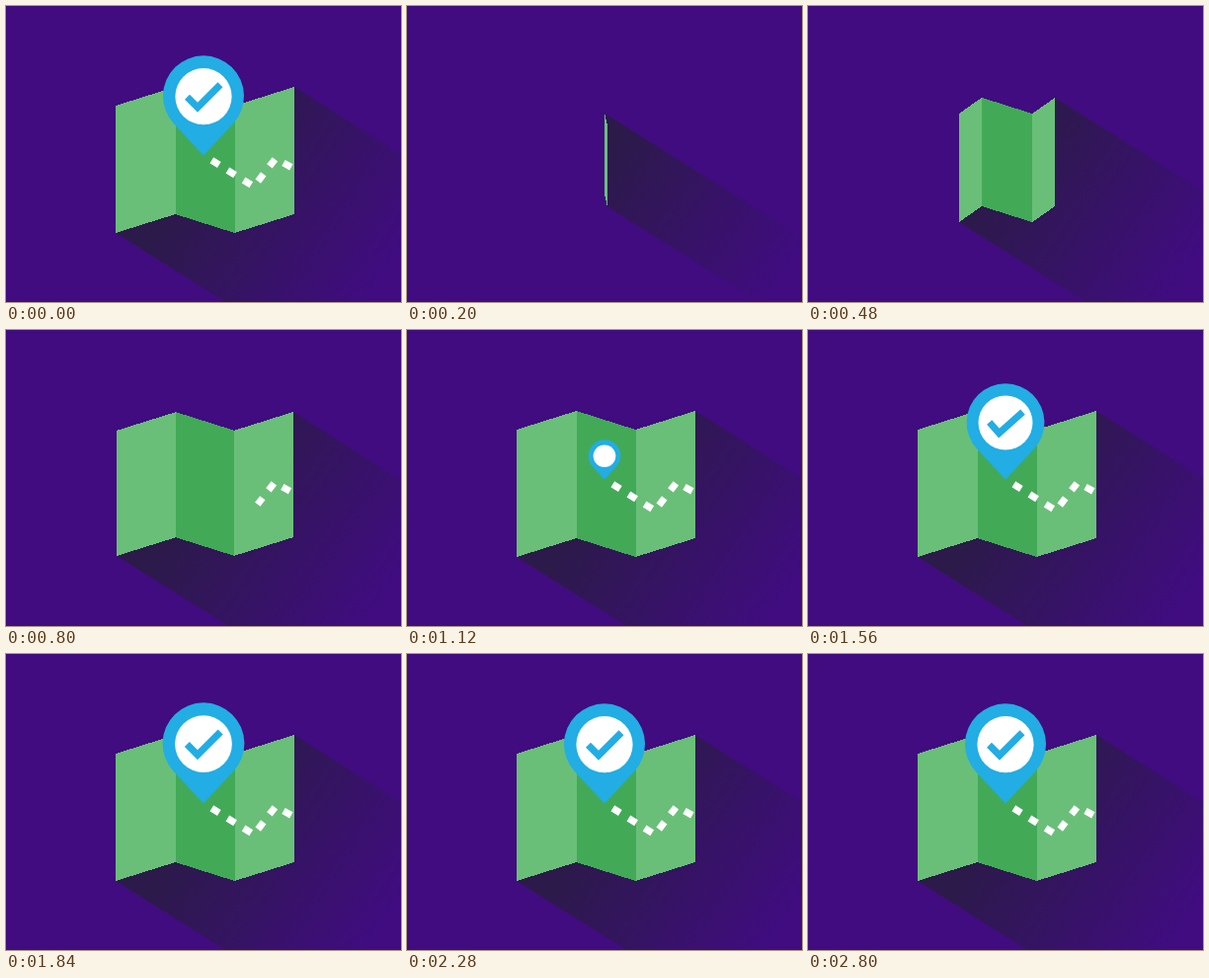
Recreate the animation shown at these times as an HTML page. Size 400 by 300 pixels, loop 2920 ms.

```html
<!DOCTYPE html>
<html lang="en">
<head>
<meta charset="utf-8">
<title>Folding map</title>
<style>
  html, body { margin: 0; width: 100%; height: 100%; overflow: hidden; background: #400c80; }
  svg { display: block; width: 100vw; height: 100vh; }
  #map polygon { shape-rendering: crispEdges; }
</style>
</head>
<body>
<svg viewBox="0 0 400 300">
  <defs>
    <linearGradient id="fade" gradientUnits="userSpaceOnUse" x1="205" y1="150" x2="385" y2="270">
      <stop offset="0" stop-color="#2c1a4a"/>
      <stop offset="1" stop-color="#2c1a4a" stop-opacity="0"/>
    </linearGradient>
    <mask id="reveal" maskUnits="userSpaceOnUse" x="-100" y="-100" width="200" height="200">
      <path id="wipe" fill="none" stroke="#fff" stroke-width="14"/>
    </mask>
  </defs>
  <rect width="400" height="300" fill="#400c80"/>
  <g id="scene">
    <polygon id="shadow" fill="url(#fade)"/>
    <g id="map">
      <polygon id="left" fill="#6abf78"/>
      <polygon id="middle" fill="#42aa57"/>
      <polygon id="right" fill="#6abf78"/>
      <g mask="url(#reveal)">
        <path id="trail" fill="none" stroke="#fff" stroke-width="7" stroke-dasharray="9 10.1"/>
      </g>
    </g>
    <g id="pin">
      <path d="M0 0L-29.9-32A41 41 0 1 1 29.9-32Z" fill="#22ade4"/>
      <circle cy="-59.7" r="28.6" fill="#fff"/>
      <path id="check" d="M-16.5 .5L-6 11L17-12" fill="none" stroke="#22ade4" stroke-width="7"/>
    </g>
  </g>
</svg>
<script>
const LOOP = 2920, STEP = 40, LAST = 2800;
const CX = 201.5, CY = 156;      // centre of the map
const HALF = 30, SIDE = 60.5;    // half the middle panel, width of a side panel
const HIGH = 74, LOW = 55;       // corner heights of the zigzag
const SLOPE = 0.63, FAR = 420;   // shadow direction and reach
const TRAIL = 104.5;

const el = id => document.getElementById(id);
const set = (id, name, value) => el(id).setAttribute(name, value);
const clamp = x => Math.min(1, Math.max(0, x));
const span = (t, a, b) => clamp((t - a) / (b - a));
const swing = u => (1 - Math.cos(Math.PI * u)) / 2;

const mapScale = [[160, 0.61], [200, 0.64], [480, 0.853], [560, 0.95], [670, 1.048], [800, 0.985], [920, 1.008], [1040, 1]];
const pinScale = [[1060, 0], [1268, 1.14], [1360, 1.09], [1530, 0.96], [1830, 1.01], [2100, 1]];
const checkScale = [[1120, 0], [1360, 0.93], [1480, 1.04], [1700, 1]];

// Smooth curve through the keys that never overshoots them.
function curve(keys, t) {
  const n = keys.length - 1;
  if (t <= keys[0][0]) return keys[0][1];
  if (t >= keys[n][0]) return keys[n][1];
  const slope = i => (keys[i + 1][1] - keys[i][1]) / (keys[i + 1][0] - keys[i][0]);
  const tangent = i => {
    if (i === 0) return slope(0);
    if (i === n) return 0;
    const a = slope(i - 1), b = slope(i);
    return a * b <= 0 ? 0 : 2 * a * b / (a + b);
  };
  let i = 0;
  while (t >= keys[i + 1][0]) i++;
  const h = keys[i + 1][0] - keys[i][0], u = (t - keys[i][0]) / h, v = 1 - u;
  return keys[i][1] * v * v * (1 + 2 * u) + h * tangent(i) * u * v * v
    + keys[i + 1][1] * u * u * (3 - 2 * u) - h * tangent(i + 1) * u * u * v;
}

// A panel between two upright edges; "up" tells which edge sits higher.
function panel(id, x1, up1, x2, up2) {
  const top = up => up ? -HIGH : -LOW, foot = up => up ? LOW : HIGH;
  set(id, 'points', [x1, top(up1), x2, top(up2), x2, foot(up2), x1, foot(up1)].join(' '));
}

function draw(t) {
  const settled = t < STEP;
  el('scene').style.display = !settled && t < 160 ? 'none' : '';
  if (settled) t = LAST;

  const s = curve(mapScale, t);
  const open = swing(span(t, 156, 410));
  const unfold = 2 * swing(span(t, 300, 578)) - 1;
  const fold = HALF * open, edge = fold + SIDE * open * unfold;

  set('map', 'transform', `translate(${CX} ${CY}) scale(${s})`);
  panel('left', -edge, false, -fold, true);
  panel('middle', -fold, true, fold, false);
  panel('right', fold, false, edge, true);

  const reach = s * Math.max(-fold, edge);
  const x1 = CX + reach, y1 = CY - HIGH * s, x2 = CX - reach, y2 = CY + HIGH * s;
  set('shadow', 'points', [x1, y1, x1 + FAR, y1 + FAR * SLOPE, x2 + FAR, y2 + FAR * SLOPE, x2, y2].join(' '));

  const shown = span(t, 680, 950);
  el('trail').style.display = shown ? '' : 'none';
  set('wipe', 'stroke-dasharray', `0 ${TRAIL * (1 - shown)} 300 0`);

  const p = curve(pinScale, t);
  el('pin').style.display = p > 0 ? '' : 'none';
  set('pin', 'transform', `translate(200 151.4) scale(${p})`);

  // The check mark turns upright as it grows.
  const c = curve(checkScale, t);
  set('check', 'transform', `translate(0 -59.7) rotate(${120 * (c - 1)}) scale(${c})`);
}

const route = 'M6.7 .3L49.5 27L71.5-1.4L88.5 8';
set('trail', 'd', route);
set('wipe', 'd', route);

const start = performance.now();
function tick() {
  const t = (performance.now() - start) % LOOP;
  draw(Math.min(LAST, Math.floor(t / STEP) * STEP));
  requestAnimationFrame(tick);
}
tick();
</script>
</body>
</html>
```
